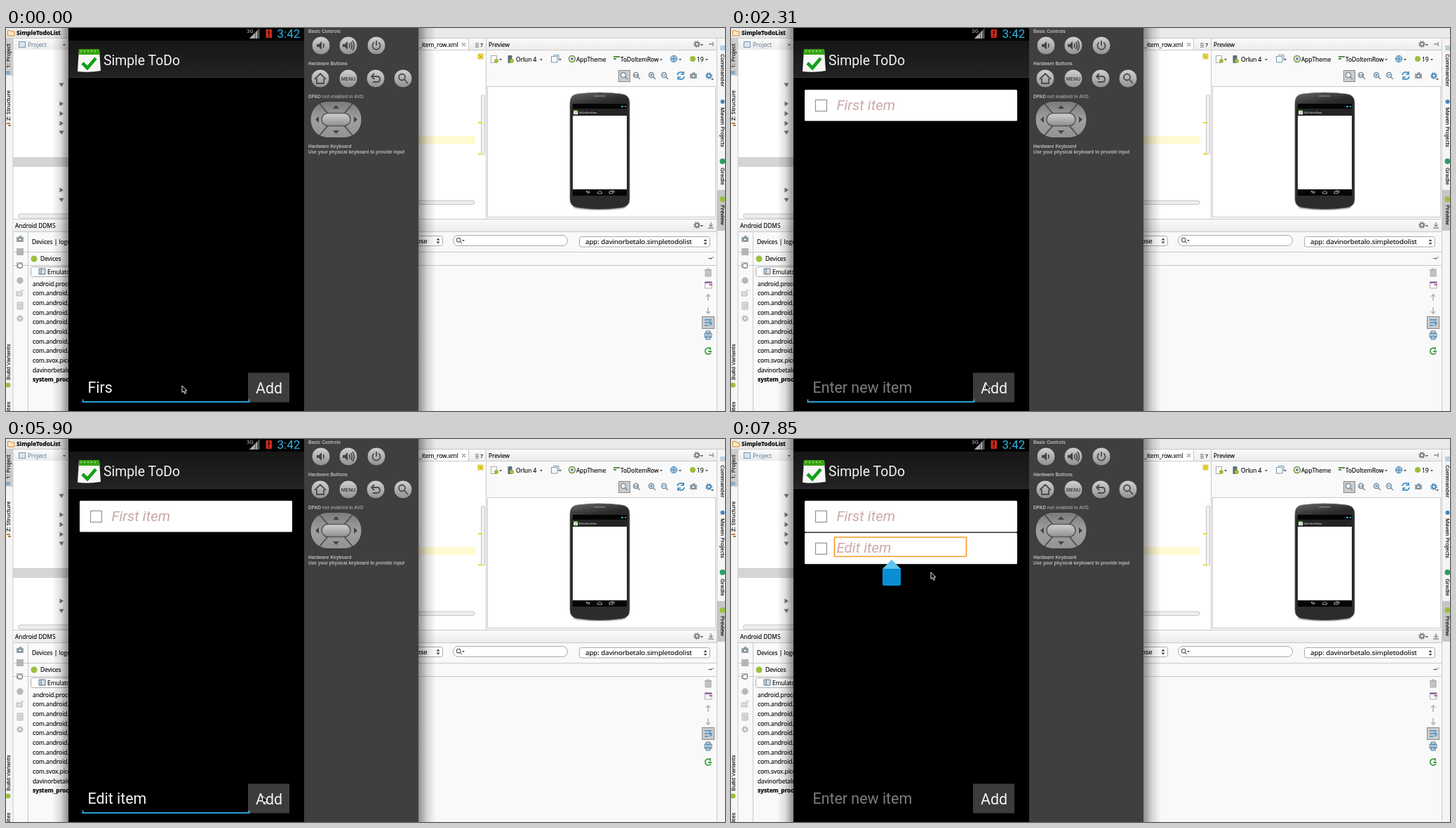
An HTML page for the animation above (8000 ms loop, 1025 by 546 pixels).

```html
<!DOCTYPE html>
<html lang="en">
<head>
<meta charset="utf-8">
<title>Simple ToDo</title>
<style>
html, body { margin: 0; width: 100%; height: 100%; overflow: hidden; background: #f9f9f9; }
svg { display: block; width: 1025px; height: 546px; }
text { white-space: pre; }
.ide { font: 8.35px "Open Sans", "Noto Sans", sans-serif; }
.ide text { stroke: #000; stroke-width: .15; }
.side { font-size: 8px; }
.big { font-size: 9.7px; }
.bold { font-weight: 700; }
.droid { font-family: Roboto, sans-serif; fill: #f3f3f3; }
.field { font-size: 21.4px; }
.item { font-size: 20.5px; font-style: italic; fill: #cba8a8; }
.panel { font: 700 6.5px "Liberation Sans", Arial, sans-serif; fill: #b9b9b9; }
.line { fill: none; stroke: #c9c9c9; }
.edge { fill: #fff; stroke: #aaa; }
.ink { fill: none; stroke: #4b4b4b; stroke-width: 1.8; }
.dark { fill: #444; }
.blue { fill: none; stroke: #3d8dc4; stroke-width: 1.6; }
.grey { fill: none; stroke: #8a8a8a; stroke-width: 1.3; }
.dot { fill: #9bbf3b; }
</style>
</head>
<body>
<svg viewBox="0 0 1025 546">
<defs>
  <linearGradient id="bar" x2="0" y2="1"><stop stop-color="#fafafa"/><stop offset="1" stop-color="#ececec"/></linearGradient>
  <linearGradient id="key" x2="0" y2="1"><stop stop-color="#d2d2d2"/><stop offset="1" stop-color="#8f8f8f"/></linearGradient>
  <linearGradient id="dpad" x2="0" y2="1"><stop stop-color="#7a7a7a"/><stop offset=".5" stop-color="#a0a0a0"/><stop offset="1" stop-color="#929292"/></linearGradient>
  <linearGradient id="action" x2="0" y2="1"><stop stop-color="#161616"/><stop offset="1" stop-color="#232323"/></linearGradient>
  <linearGradient id="shadeL"><stop stop-opacity="0"/><stop offset=".5" stop-opacity=".12"/><stop offset="1" stop-opacity=".43"/></linearGradient>
  <linearGradient id="shadeR"><stop stop-opacity=".43"/><stop offset=".5" stop-opacity=".14"/><stop offset="1" stop-opacity="0"/></linearGradient>
  <linearGradient id="case" x2=".1" y2="1"><stop stop-color="#666"/><stop offset=".14" stop-color="#292929"/><stop offset="1" stop-color="#2c2c2c"/></linearGradient>
  <path id="right" d="M-2.5-3.5 3 0-2.5 3.5Z" fill="#777"/>
  <path id="down" d="M-3.5-2.5H3.5L0 3Z" fill="#777"/>
  <path id="drop" d="M-2-1H2L0 1.5Z" fill="#555"/>
  <path id="updown" d="M-2.5-1 0-4 2.5-1ZM-2.5 1 0 4 2.5 1Z" fill="#444"/>
  <circle id="knob" r="13" fill="url(#key)" stroke="#2f2f2f" stroke-width=".8"/>
  <g id="lens"><circle cx="-1" cy="-1" r="3.6" fill="#eef4f8"/><path d="M1.7 1.7 5 5"/></g>
  <g id="gear"><circle r="2.6" fill="none" stroke-width="1.8"/><circle r="4.2" fill="none" stroke-width="1.3" stroke-dasharray="1.7 1.6"/></g>
  <g id="camera"><path d="M-5-3H-2L-1-5H2L3-3H5V4H-5Z" fill="#9aa4ab"/><circle cy=".5" r="2.3" fill="#e8f0f5" stroke="#5b6c78"/></g>
  <g id="calendar">
    <path d="M2 1H31L33 31Q17 34 0 32Z" fill="#f7f7f5"/>
    <path d="M2 0H31L31.5 8H1.5Z" fill="#38a512"/>
    <path d="M4 3H29" stroke="#b6e39c" stroke-width="1.5" stroke-dasharray="2 3"/>
    <path d="M7 20 14 27 26 13" fill="none" stroke="#12a01a" stroke-width="4.6"/>
  </g>
  <g id="row">
    <rect width="303" height="44.5" rx="1.5" fill="#fff"/>
    <rect x="15.5" y="14.5" width="16" height="16" fill="#fff" stroke="#929292" stroke-width="1.2"/>
  </g>
</defs>

<g class="ide">
  <rect width="1025" height="546" fill="#f9f9f9"/>
  <rect width="1025" height="14" fill="#e9e9e9"/>
  <path d="M0 14.5H1025" class="line"/>
  <path d="M2.5 3.5H6L7 5H12V11H2.5Z" fill="#ffe9c4" stroke="#d58a2c"/>
  <text x="15" y="10" class="bold">SimpleTodoList</text>

  <!-- project tree -->
  <rect x="10" y="31" width="79" height="242" fill="#fff"/>
  <rect x="10" y="15" width="79" height="16" fill="url(#bar)"/>
  <rect x="18.5" y="19.5" width="9" height="8" fill="#d9e4ee" stroke="#7d96ab"/>
  <text x="31" y="27" style="fill:#53738c;stroke:none">Project</text>
  <use href="#drop" x="83" y="24"/>
  <rect x="10" y="184" width="79" height="14" fill="#d5d5d5"/>
  <g><use href="#down" x="79" y="81"/><use href="#right" x="79" y="108"/><use href="#right" x="79" y="122"/><use href="#right" x="79" y="136"/><use href="#down" x="79" y="149"/><use href="#right" x="79" y="231"/><use href="#down" x="79" y="245"/></g>
  <rect x="17.5" y="265" width="90" height="6" rx="3" fill="#eee" stroke="#c5c5c5"/>

  <!-- left tool strip -->
  <rect y="15" width="10" height="531" fill="#f5f5f5"/>
  <rect y="15" width="10" height="53" fill="#cdcdcd"/>
  <path d="M10 15V546" class="line"/>
  <g class="side">
    <text transform="translate(6 57)rotate(-90)">1: Project</text>
    <text transform="translate(6 132)rotate(-90)">Z: Structure</text>
    <text transform="translate(6 502)rotate(-90)">Build Variants</text>
    <text transform="translate(6 554)rotate(-90)">orites</text>
  </g>
  <rect y="61" width="6" height="5" fill="#88abc7"/>
  <path d="M1 136H6M3 139H7" stroke="#b57a3b" stroke-width="2"/>
  <circle cx="3" cy="509" r="3.5" class="dot"/>

  <!-- editor -->
  <rect x="588" y="31" width="96" height="241" fill="#fff"/>
  <rect x="588" y="15" width="96" height="16" fill="url(#bar)"/>
  <rect x="588" y="16" width="71" height="15" fill="#fff"/>
  <text x="589" y="27">_item_row.xml</text>
  <path d="M650 21 655 26M655 21 650 26" stroke="#666"/>
  <path d="M659.5 15V31M588 31.5H683" class="line"/>
  <path d="M669 22H674M669 24.5H674M669 27H674" stroke="#666"/>
  <text x="676" y="27" font-size="7">7</text>
  <rect x="588" y="154" width="81" height="11" fill="#fffad0"/>
  <rect x="677.5" y="95.5" width="5" height="85" rx="2" fill="#f0f0f0" stroke="#c5c5c5"/>
  <path d="M673 135H679M673 179.5H679" stroke="#efd91c" stroke-width="2"/>
  <rect x="673" y="37" width="7" height="7" fill="#f2dc35" stroke="#b5a126" stroke-width=".6"/>
  <path d="M675 39 678 42" stroke="#7b6c1c"/>
  <rect x="560" y="246" width="108" height="5.5" rx="3" fill="#eee" stroke="#c5c5c5"/>

  <!-- preview -->
  <rect x="684" y="15" width="330" height="16" fill="url(#bar)"/>
  <path d="M684.5 15V272M684 31.5H1014" class="line"/>
  <text x="688" y="27">Preview</text>
  <use href="#gear" x="985" y="23" stroke="#777"/><use href="#drop" x="992" y="24"/>
  <path d="M1002 23H1008M1008 20V26" class="grey"/>
  <rect x="691.5" y="39.5" width="8" height="10" class="edge"/><circle cx="699" cy="47" r="3" class="dot"/><use href="#drop" x="705" y="45"/>
  <rect x="715.5" y="39" width="6" height="11" rx="1" fill="#5f6d74"/><circle cx="721" cy="47" r="3" class="dot"/>
  <text x="727" y="47.5">Orlun 4</text><use href="#drop" x="763" y="45"/>
  <path d="M777.5 40.5H786V49H777.5ZM780 38.5H788V46" fill="none" stroke="#6e96b4"/><use href="#drop" x="790" y="45"/>
  <circle cx="807" cy="44" r="4.5" fill="#e9f0d9" stroke="#6e9140" stroke-width="1.4"/><circle cx="807" cy="44" r="1.8" fill="#5271b5"/>
  <text x="813" y="47.5">AppTheme</text>
  <path d="M866 41H875M866 44H870" stroke="#638b3f" stroke-width="2"/>
  <text x="876" y="47.5">ToDoItemRow</text><use href="#drop" x="934" y="45"/>
  <circle cx="952" cy="44" r="4.7" fill="#a7cbe5" stroke="#4e86b1"/><path d="M948 44H956M952 40V48" stroke="#4e86b1"/><use href="#drop" x="961" y="45"/>
  <circle cx="979" cy="44" r="4" class="dot"/><text x="985" y="47.5">19</text><use href="#drop" x="999" y="45"/>
  <rect x="873.5" y="60.5" width="16" height="16" fill="#ccc" stroke="#8a8a8a"/>
  <g stroke="#71899a" stroke-width="1.3"><use href="#lens" x="881" y="68"/><use href="#lens" x="899" y="68"/><use href="#lens" x="921" y="68"/><use href="#lens" x="939" y="68"/></g>
  <path d="M918 67H922M920 65V69M936 67H940" stroke="#3d79aa"/>
  <text x="895.5" y="69" font-size="4">1:1</text>
  <path d="M957 67A5 5 0 0 1 966 65M967 69A5 5 0 0 1 958 71M966 62V66H962M958 74V70H962" class="blue"/>
  <use href="#camera" x="980" y="68"/><use href="#gear" x="1002" y="68" stroke="#3d83b8"/><use href="#drop" x="1007" y="73"/>
  <rect x="686.5" y="83.5" width="325" height="186" fill="#fff" stroke="#c9c9c9"/>
  <ellipse cx="846" cy="256" rx="38" ry="4" fill="#ccc"/>
  <path d="M804 107Q804 95 815 94Q846 90 877 94Q889 95 889 107V244Q889 254 879 256Q846 261 814 256Q804 254 804 244Z" fill="url(#case)" stroke="#777" stroke-width=".8"/>
  <path d="M838 97H854" stroke="#888" stroke-width="1.3"/>
  <path d="M808 108H885V239H808Z" fill="#050505"/>
  <path d="M808 115H885V125H808Z" fill="#242424"/>
  <path d="M808 125H885V230H808Z" fill="#fff"/>
  <path d="M877 112H880M882 112H884" stroke="#2fa9d9" stroke-width="2"/>
  <use href="#calendar" transform="translate(809 117)scale(.19)"/>
  <text x="816" y="122" font-size="4" style="fill:#eee;stroke:none">ToDoItemRow</text>
  <path d="M828 235H832Q833 233 830 233H827M828.5 231.7 827 233 828.5 234.5M843.5 236V234L846.5 232 849.5 234V236ZM860 236H865V233H860ZM862 232H867V235" fill="none" stroke="#ccc" stroke-width=".8"/>

  <!-- device monitor -->
  <rect x="10" y="273" width="1004" height="17" fill="url(#bar)"/>
  <path d="M10 272.5H1014M10 290.5H1014M10 319.5H1014M10 338.5H1014M31.5 291V546" class="line"/>
  <text x="13" y="284.5">Android DDMS</text>
  <use href="#gear" x="985" y="281" stroke="#777"/><use href="#drop" x="992" y="282"/>
  <path d="M1005 277V283M1002.5 280.5 1005 283 1007.5 280.5M1001 285H1009" class="grey"/>
  <text x="37" y="308">Devices | logcat</text>
  <circle cx="40" cy="329" r="4.5" class="dot"/><text x="49" y="332">Devices</text>
  <rect x="35.5" y="340.5" width="75" height="14" rx="3" class="edge"/>
  <path d="M47 343H56V351H47ZM50 343V351" fill="#d5e0e8" stroke="#566f82"/><text x="59" y="350.5">Emulator</text>
  <g id="processes"></g>
  <use href="#camera" x="20" y="301"/>
  <rect x="15" y="314" width="10" height="10" fill="#b5b5b5"/>
  <rect x="15.5" y="334.5" width="8" height="7" class="edge"/><circle cx="20" cy="339" r="3.4" class="grey"/>
  <circle cx="20" cy="360" r="4.7" fill="#b8b8b8"/>
  <path d="M15 376H23V382H15ZM21 374H26M16 391H24V401H16ZM18 395H23M18 398H23" fill="#ddd" stroke="#b7b7b7"/>
  <use href="#gear" x="20" y="414" stroke="#b5b5b5"/>
  <rect x="560" y="296.5" width="62.5" height="14" rx="3" class="edge"/><text x="575" y="306.5" class="big">rbose</text><use href="#updown" x="616" y="303.5"/>
  <rect x="637.5" y="295.5" width="163" height="15" rx="7.5" class="edge"/>
  <g stroke="#555" stroke-width="1.3"><use href="#lens" transform="translate(646 303)scale(.8)"/></g><use href="#drop" x="652" y="303"/>
  <rect x="817.5" y="297.5" width="186" height="14.5" rx="3" class="edge"/>
  <text x="826" y="308" class="big">app: davinorbetalo.simpletodolist</text><use href="#updown" x="997" y="305"/>
  <path d="M1001 328.5H1006M1004.5 327 1006 328.5 1004.5 330M1008 326V328" stroke="#666" fill="none"/>
  <path d="M997 345H1005V354H997ZM996 344.5H1006M999 343H1003" fill="#c4c4c4" stroke="#aaa"/>
  <path d="M996.5 361.5H1006V371H996.5Z" class="edge"/><path d="M996 363H1006" stroke="#9063a5" stroke-width="2"/><path d="M1002 366H1007" stroke="#c36b9a" stroke-width="2"/>
  <path d="M1001 389V380M998 383 1001 380 1004 383M1001 398V407M998 404 1001 407 1004 404" fill="none" stroke="#b5b5b5" stroke-width="1.6"/>
  <rect x="992.5" y="411.5" width="17" height="17" fill="#ccc" stroke="#888"/>
  <path d="M996 416H1006M996 420H1005M996 424H1001M1003 418 1006 421 1003 424" class="blue"/>
  <path d="M996 435H1006V441H996ZM998 432H1004V436H998ZM998 439H1004V444H998Z" fill="#c6dceb" stroke="#517c9d"/>
  <path d="M1004 457A4.5 4.5 0 1 0 1005 463M1001 461H1006M1004 455V459" fill="none" stroke="#43a143" stroke-width="1.8"/>

  <!-- right tool strip -->
  <rect x="1014" y="15" width="11" height="531" fill="#f5f5f5"/>
  <rect x="1014" y="231" width="11" height="58" fill="#c6c6c6"/>
  <path d="M1013.5 15V546" class="line"/>
  <g class="side">
    <text transform="translate(1018.5 37)rotate(90)">Commander</text>
    <text transform="translate(1018.5 113)rotate(90)">Maven Projects</text>
    <text transform="translate(1018.5 199)rotate(90)">Gradle</text>
    <text transform="translate(1018.5 252)rotate(90)">Preview</text>
  </g>
  <path d="M1018 25H1025V32H1018Z" fill="#b9cede"/>
  <circle cx="1021.5" cy="105" r="3" fill="#4284bd"/><circle cx="1021.5" cy="190" r="4" fill="#2b9c64"/><circle cx="1021.5" cy="244" r="4" class="dot"/>
</g>

<!-- emulator -->
<rect x="66" width="23" height="546" fill="url(#shadeL)"/>
<rect x="588" width="25" height="546" fill="url(#shadeR)"/>
<rect x="89" width="336" height="546"/>
<rect x="425" width="163" height="546" fill="#3f3f3f"/>
<rect x="89" y="18" width="336" height="53" fill="url(#action)"/>
<path d="M89 70.5H425" stroke="#333"/>
<g class="droid">
  <text x="343" y="7" font-size="8" fill="#bbb">3G</text>
  <path d="M347 15H361.5V0Z" fill="#555"/><path d="M347 15H355V6.7ZM356 15V5.7L358 3.7V15Z" fill="#aaa"/>
  <path d="M370.5 2H379V14H370.5Z" fill="#c92c1d"/><path d="M374.7 3.5V9M374.7 10.5V12.3" stroke="#300" stroke-width="1.8"/>
  <text x="386.5" y="14" font-size="17" fill="#33b5e5">3:42</text>
  <use href="#calendar" x="102" y="30"/>
  <text x="139" y="53" font-size="19.4">Simple ToDo</text>
  <rect x="345" y="491.5" width="59" height="42" fill="#3c3c3c"/>
  <text x="356" y="520.5" class="field">Add</text>
  <path id="underline" d="M109.5 529.5V533H346.5V529.5" fill="none" stroke="#27a0d4" stroke-width="2"/>
  <text id="entry" x="116.5" y="520" class="field"></text>
  <g id="first"><use href="#row" x="105" y="88"/><text x="150.5" y="116.5" class="item">First item</text></g>
  <g id="second"><use href="#row" x="105" y="133.8"/><text x="150.5" y="161.7" class="item">Edit item</text></g>
  <g id="focus">
    <rect x="147.5" y="140" width="188" height="27.5" rx="1" fill="none" stroke="#f59a23" stroke-width="1.7"/>
    <path d="M229 172 242 185H216Z" fill="#5cc4ee"/><path d="M216 185H242V207Q242 209 240 209H218Q216 209 216 207Z" fill="#0a8ed3"/>
  </g>
</g>

<g class="panel">
  <text x="431" y="6.5">Basic Controls</text>
  <text x="431" y="52.5">Hardware Buttons</text>
  <text x="431" y="100">DPAD <tspan fill="#999">not enabled in AVD</tspan></text>
  <text x="431" y="171">Hardware Keyboard</text>
  <text x="431" y="178.5">Use your physical keyboard to provide input</text>
  <use href="#knob" x="449" y="25"/><use href="#knob" x="488" y="25"/><use href="#knob" x="528" y="25"/>
  <use href="#knob" x="448" y="72"/><use href="#knob" x="488" y="72"/><use href="#knob" x="527" y="72"/><use href="#knob" x="566" y="72"/>
  <path d="M443 23H446L450 19V31L446 27H443ZM480 23H483L487 19V31L483 27H480Z" class="dark"/>
  <path d="M452 22Q454 25 452 28M489 22Q491 25 489 28M491.5 20Q495 25 491.5 30M494 18Q498.5 25 494 32M525 20.5A5.5 5.5 0 1 0 531 20.5M528 18V25" class="ink"/>
  <path d="M440 73 448 65 456 73M443 72V79H453V72M522 69H529Q533 69 533 73T529 77H523M525 65 521 69 525 73" class="ink"/>
  <circle cx="564.5" cy="70" r="4.5" class="ink"/><path d="M568 73.5 573 79" class="ink"/>
  <text x="488" y="75" text-anchor="middle" font-size="7" class="dark">MENU</text>
  <rect x="434" y="104.5" width="73" height="52" rx="25" fill="url(#dpad)" stroke="#333"/>
  <path d="M447 108 459 122M494 108 482 122M447 153 459 139M494 153 482 139" class="ink"/>
  <rect x="450" y="121.5" width="41" height="18" rx="9" fill="url(#key)" stroke="#555" stroke-width="1.5"/>
  <path d="M466 115H475L470.5 110ZM466 146H475L470.5 151ZM446 126V135L441 130.5ZM496 126V135L501 130.5Z" class="dark"/>
</g>

<path id="pointer" d="M0 0V9.5L2.2 7.5 3.8 11.2 5.5 10.4 4 7H6.8Z" stroke="#fff" stroke-width=".9"/>
</svg>
<script>
const LOOP = 8000;
const HINT = "Enter new item";
const FIRST_ADDED = 2310, SECOND_ADDED = 6200, FOCUSED = 7400;

const entries = [
  [0, "Firs"], [150, "First"], [960, "First i"], [1110, "First ite"], [1260, "First item"],
  [FIRST_ADDED, HINT], [3960, "E"], [4260, "Edi"], [4410, "Edit"],
  [4860, "Edit i"], [5010, "Edit ite"], [5150, "Edit item"], [SECOND_ADDED, HINT]
];
const moves = [
  [0, 251, 510], [1560, 296, 509], [1710, 364, 506], [1860, 397, 507],
  [2310, 363, 507], [2460, 318, 508], [2610, 240, 511], [2760, 206, 512],
  [5450, 232, 511], [5600, 300, 506], [5750, 348, 503], [5900, 366, 509],
  [6350, 345, 440], [6500, 300, 330], [6650, 262, 220], [6800, 243, 165], [6950, 237, 146],
  [7550, 245, 155], [7700, 268, 176], [7850, 285, 190]
];

const byId = id => document.getElementById(id);
const latest = (track, t) => track.filter(([at]) => at <= t).pop();
const show = (id, on) => byId(id).setAttribute("visibility", on ? "visible" : "hidden");

const processes = ["android.process.acore",
  ...["calendar", "contacts", "deskclock", "email", "exchange", "launcher", "settings"].map(n => "com.android." + n),
  "com.svox.pico", "davinorbetalo.simpletodolist", "system_process"];
byId("processes").innerHTML = processes.map((name, i) =>
  `<text x="38" y="${367.5 + 13.68 * i}"${name === "system_process" ? ' class="bold"' : ""}>${name}</text>`).join("");

function draw(t) {
  const [, text] = latest(entries, t);
  const [, x, y] = latest(moves, t);
  const entry = byId("entry");
  entry.textContent = text;
  entry.style.fill = text === HINT ? "#7d7d7d" : "#f3f3f3";
  byId("pointer").setAttribute("transform", `translate(${x} ${y})`);
  show("first", t >= FIRST_ADDED);
  show("second", t >= SECOND_ADDED);
  show("focus", t >= FOCUSED);
  show("underline", t < FOCUSED);
}

const start = performance.now();
function tick() {
  draw((performance.now() - start) % LOOP);
  requestAnimationFrame(tick);
}
tick();
</script>
</body>
</html>
```
